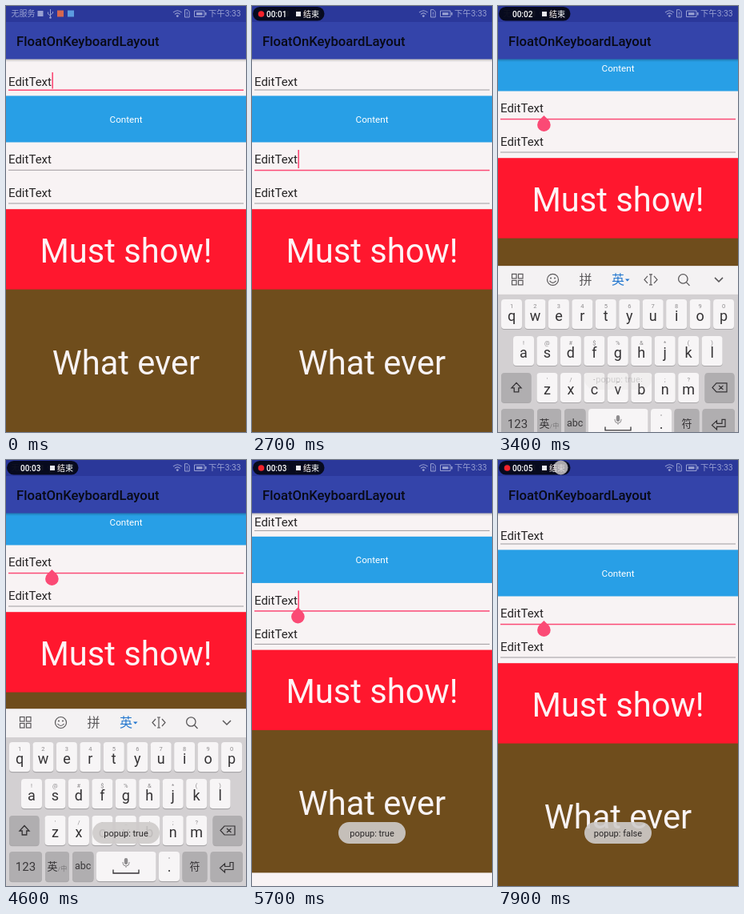
These frames come from a looping animation (300x533 px, 8000 ms). An HTML page with a canvas:

```html
<!DOCTYPE html>
<html lang="zh">
<head>
<meta charset="utf-8">
<title>FloatOnKeyboardLayout</title>
<style>
html, body { margin: 0; width: 100%; height: 100%; overflow: hidden; background: #f8f3f4; }
canvas { display: block; width: 300px; height: 533px; }
</style>
</head>
<body>
<canvas id="stage"></canvas>
<script>
const W = 300, H = 533, LOOP = 8000, STEP = 100;
const PINK = '#fb4a75', GREY = '#a09b9f', INK = '#262425', KEY_INK = '#343234';
const FONT = 'Roboto, "Noto Sans CJK SC", "Noto Sans CJK", sans-serif';
const canvas = document.getElementById('stage');
const c = canvas.getContext('2d');
const dpr = window.devicePixelRatio || 1;
canvas.width = W * dpr;
canvas.height = H * dpr;

const ramp = (t, a, b) => Math.min(1, Math.max(0, (t - a) / (b - a)));
const smooth = x => x * x * (3 - 2 * x);
const between = (t, a, b) => t >= a && t < b;
const countPassed = (list, t) => list.filter(x => t >= x).length;

function rect(x, y, w, h, color) {
  c.fillStyle = color;
  c.fillRect(x, y, w, h);
}

function round(x, y, w, h, r, color) {
  c.fillStyle = color;
  c.beginPath();
  c.roundRect(x, y, w, h, r);
  c.fill();
}

function disc(x, y, r, color) {
  c.fillStyle = color;
  c.beginPath();
  c.arc(x, y, r, 0, 7);
  c.fill();
}

function label(s, x, y, size, color, align = 'left', weight = 400) {
  c.font = `${weight} ${size}px ${FONT}`;
  c.textAlign = align;
  c.fillStyle = color;
  c.fillText(s, x, y);
}

function path(d, color, width = 1) {
  c.strokeStyle = color;
  c.lineWidth = width;
  c.stroke(new Path2D(d));
}

function withAlpha(a, draw) {
  if (a <= 0) return;
  c.save();
  c.globalAlpha = a;
  draw();
  c.restore();
}

function shifted(y, draw) {
  c.save();
  c.translate(0, y);
  draw();
  c.restore();
}

function editText(base, line, focused) {
  label('EditText', 3, base, 15, INK);
  rect(3, line, 294, focused ? 1.5 : 1, focused ? PINK : GREY);
}

// circle with a square corner pointing up
function handle(x, y, r) {
  const k = r * Math.SQRT1_2;
  c.fillStyle = PINK;
  c.fill(new Path2D(`M${x} ${y - 2 * k} L${x + k} ${y - k} A${r} ${r} 0 1 1 ${x - k} ${y - k}Z`));
}

function page(t) {
  const second = t >= 2600;
  editText(99.5, 104.5, !second);
  rect(0, 112.4, W, 58.1, '#289fe6');
  label('Content', 150, 146, 11.67, '#fff', 'center');
  editText(197.4, 204.8, t >= 2300);
  editText(239.4, 246.5, false);
  rect(0, 354, W, 179, '#6f4d1c');
  rect(0, 254.2, W, 100.4, '#ff172e');
  label('Must show!', 150, 321, 41.67, '#fdf3f5', 'center');
  label('What ever', 150, 461, 41.67, '#f8f3f4', 'center');
  // caret toggles: starts visible, each entry flips it
  const flips = [300, 1000, 1700, 2600, 3400, 4000, 4600, 5300, 5800, 7200, 7500];
  if (countPassed(flips, t) % 2 === 0) rect(57.4, second ? 180 : 83, 1.6, second ? 23 : 20.5, PINK);
  withAlpha(ramp(t, 2900, 3200), () => handle(57.4, 212.7, 8.3));
}

function toolbar() {
  const g = c.createLinearGradient(0, 66, 0, 70);
  g.addColorStop(0, 'rgba(0,0,0,.25)');
  g.addColorStop(1, 'rgba(0,0,0,0)');
  rect(0, 66, W, 4, g);
  rect(0, 0, W, 20, '#2b389a');
  rect(0, 20, W, 46.5, '#3444aa');
  label('FloatOnKeyboardLayout', 13, 50, 16.67, '#080a16', 'left', 500);
}

function statusBar(t) {
  const tint = '#98a0d2';
  label('无服务', 6.5, 13.4, 10, tint);
  rect(39.5, 6, 7, 7, tint);
  path('M55.5 4V15M52.5 7.5V10L55.5 12M58.5 7V9L55.5 11', tint, 1);
  disc(55.5, 14.5, 1.3, tint);
  rect(64, 5.5, 8, 8, '#d5674f');
  rect(77, 5.5, 8, 8, '#5b9be0');
  path('M209 8.2Q214.3 3.4 219.6 8.2M211 10.4Q214.3 7.3 217.6 10.4', tint, 1.1);
  disc(214.3, 12.6, 1.4, tint);
  path('M223.5 4.7H227L229.2 7V14H223.5Z M226.3 7.5V10.5 M226.3 11.5V12.5', tint, 1);
  path('M235.5 6H248V13.5H235.5Z', tint, 1);
  rect(238, 8.2, 7.5, 3.2, tint);
  rect(249, 8, 1.5, 3.5, tint);
  label('下午3:33', 293.5, 13.4, 10.3, tint, 'right');

  withAlpha(ramp(t, 0, 300), () => {
    round(1, 1, 89.5, 17.5, 8.7, 'rgba(5,7,20,.92)');
    const lit = countPassed([600, 1400, 2100, 3200, 3800, 4300, 5000, 5800, 7000, 7300, 7800], t) % 2;
    if (lit) disc(11.5, 10, 3.8, '#f5222b');
    const secs = countPassed([1300, 3200, 4300, 5800, 7300], t);
    label('00:0' + secs, 18, 13.6, 10, '#fff', 'left', 500);
    rect(55, 7, 6, 6, '#e9e9ee');
    label('结束', 64, 13.6, 10, '#fff', 'left', 500);
  });
}

function key(x, y, w, dark) {
  round(x, y + 1.2, w, 37, 4, '#aaa8aa');
  round(x, y, w, 37, 4, dark ? '#b0aeb0' : '#f7f5f6');
}

function keyRow(letters, hints, x, y) {
  [...letters].forEach((ch, i) => {
    const mid = x + i * 29.45;
    key(mid - 13, y, 26);
    label(hints[i], mid, y + 11, 7.5, '#8d8b8d', 'center');
    label(ch, mid, y + 27, 18, KEY_INK, 'center');
  });
}

function keyboard() {
  rect(0, 311.4, W, 222, '#d3d0d2');
  rect(0, 311.4, W, 35.6, '#f4f2f3');
  const ink = '#5a585a';
  for (const x of [17.5, 25.5])
    for (const y of [321.5, 329.5]) {
      c.strokeStyle = ink;
      c.lineWidth = 1.2;
      c.strokeRect(x, y, 5.5, 5.5);
    }
  path('M75.5 328.5A7 7 0 1 1 61.5 328.5A7 7 0 1 1 75.5 328.5M64.5 330Q68.5 335 72.5 330', ink, 1.2);
  disc(66, 326.5, 1, ink);
  disc(71, 326.5, 1, ink);
  label('拼', 109.5, 334.3, 16, ink, 'center');
  label('英', 150, 334.3, 16, '#2377cf', 'center', 500);
  c.fillStyle = '#2377cf';
  c.fill(new Path2D('M159 327.5H164.5L161.7 330.5Z'));
  path('M187 324L183 328.5L187 333M195 324L199 328.5L195 333M191 322V335M189 322H193M189 335H193', ink, 1.2);
  path('M237 327.5A5.7 5.7 0 1 1 225.6 327.5A5.7 5.7 0 1 1 237 327.5M235.3 331.5L239.5 336', ink, 1.3);
  path('M271 326L276 331L281 326', ink, 1.5);

  keyRow('qwertyuiop', '1234567890', 17, 353);
  keyRow('asdfghjkl', '!@#$%&*()', 32, 399);
  keyRow('zxcvbnm', "'/-_:;?", 61.5, 445);
  key(4, 445, 37.5, true);
  path('M23 457.5L29 464H25.8V469H20.2V464H17Z', KEY_INK, 1.3);
  key(258.5, 445, 37, true);
  path('M268 463.5L273 458H286V469H273ZM276 461L281.5 466M281.5 461L276 466', KEY_INK, 1.2);

  const y = 490;
  key(4, y, 41, true);
  label('123', 24.5, y + 24, 15, '#3a383a', 'center');
  key(49, y, 30, true);
  label('英', 58, y + 23, 13, KEY_INK, 'center');
  label('/中', 70.5, y + 24, 8, '#777577', 'center');
  key(83, y, 26.5, true);
  label('abc', 96.2, y + 22, 12.5, '#3a383a', 'center');
  key(113, y, 74.5);
  round(147.8, y + 8, 4.4, 8, 2.2, '#8d8b8d');
  path('M146 503V504Q146 508 150 508Q154 508 154 504V503M150 508V510', '#8d8b8d', 1);
  path('M134 512.5V517H166V512.5', KEY_INK, 1.3);
  key(191, y, 26);
  label('.', 204, y + 25, 18, KEY_INK, 'center');
  label('°', 204, y + 12, 8, '#8d8b8d', 'center');
  key(220.5, y, 31, true);
  label('符', 236, y + 23, 13, KEY_INK, 'center');
  key(255.5, y, 40.5, true);
  path('M267.5 510.5L273.5 505V508.5H280V503.5H284V512.5H273.5V516Z', KEY_INK, 1.2);
}

function toast(text, alpha) {
  withAlpha(alpha, () => {
    round(108, 453, 84, 27, 13.5, 'rgba(207,203,202,.95)');
    label(text, 150, 470.8, 11, '#201e1f', 'center');
  });
}

function touch(x, y, alpha) {
  withAlpha(alpha, () => disc(x, y, 9, '#d4d0d0'));
}

function draw(t) {
  c.setTransform(dpr, 0, 0, dpr, 0, 0);
  rect(0, 0, W, H, '#f8f3f4');
  const lift = 64 * (smooth(ramp(t, 2800, 3000)) - smooth(ramp(t, 5500, 5800)));
  shifted(-lift, () => page(t));
  toolbar();
  statusBar(t);
  const up = 1 - (1 - ramp(t, 3100, 3500)) ** 2;
  const down = ramp(t, 5100, 5500) ** 2;
  const shown = up - down;
  if (shown > 0) shifted(222 * (1 - shown), keyboard);

  toast('popup: true', 0.95 * (ramp(t, 3300, 3900) - ramp(t, 6000, 6300)));
  toast('popup: false', 0.95 * ramp(t, 6300, 6700));

  if (between(t, 2300, 2600)) touch(150, 189, 0.6);
  if (between(t, 5000, 5600)) touch(271.5, 332, t < 5400 ? 0.6 : 0.17);
  if (t >= 7800) touch(78.5, 9.5, 0.8);
}

const start = performance.now();
function tick() {
  const t = (performance.now() - start) % LOOP;
  draw(Math.floor(t / STEP) * STEP);
  requestAnimationFrame(tick);
}
tick();
</script>
</body>
</html>
```
